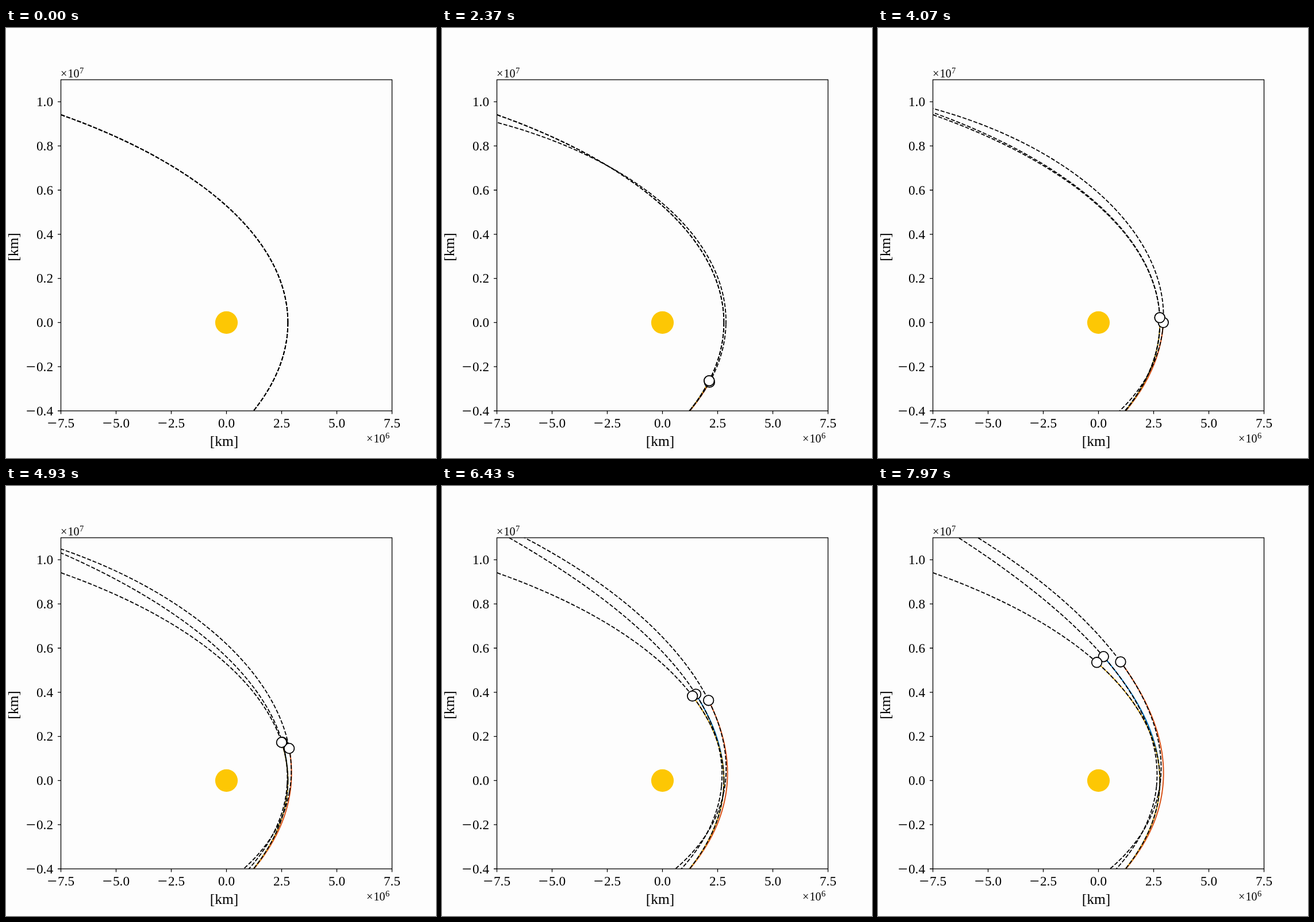
Animation of 748 by 748 pixels, one loop 8 s. Source, as an HTML page with a canvas:

```html
<!DOCTYPE html>
<html lang="en">
<head>
<meta charset="utf-8">
<title>Orbits around a star</title>
<style>
  html, body { margin: 0; width: 100%; height: 100%; overflow: hidden; background: #fdfdfd; }
  canvas { display: block; width: 748px; height: 748px; }
</style>
</head>
<body>
<canvas id="stage" width="748" height="748"></canvas>
<script>
const ctx = document.getElementById("stage").getContext("2d");
const PAPER = "#fdfdfd", INK = "#000";
const LOOP = 8000, FRAMES = 240, STEP = LOOP / FRAMES;
const BOX = { x: 95.5, y: 90, size: 576 };
const SUN = { x: 383.5, y: 512.4, r: 19.6 };
const UNIT = 38.4;                 // pixels per million km
const P = 203, ECC = 0.9;          // starting orbit, in pixels
const SPIN = 7.41;                 // angular momentum, px² per ms
const START = -Math.PI / 2;

// Each craft feels an outward push (a fraction of gravity) once past the angle `on`.
const crafts = [
  { color: "#0072bd", push: 0.1, on: 0 },
  { color: "#d95319", push: 0.1, on: START },
  { color: "#edb120", push: 0, on: 0 },
];

// Eccentricity vector of the momentary orbit.
function eccentricity(craft, a) {
  if (a <= craft.on) return [ECC, 0];
  return [
    ECC + craft.push * (Math.cos(craft.on) - Math.cos(a)),
    craft.push * (Math.sin(craft.on) - Math.sin(a)),
  ];
}

const conic = ([ex, ey], a) => P / (1 + ex * Math.cos(a) + ey * Math.sin(a));
const pathRadius = (craft, a) => conic(eccentricity(craft, a), a);
const place = (r, a) => [SUN.x + r * Math.cos(a), SUN.y - r * Math.sin(a)];

for (const craft of crafts) {
  const sub = 10, dt = STEP / sub;
  const rate = a => SPIN / pathRadius(craft, a) ** 2;
  let a = START;
  craft.angles = [];
  for (let i = 0; i < FRAMES; i++) {
    craft.angles.push(a);
    for (let k = 0; k < sub; k++) a += dt * rate(a + rate(a) * dt / 2);
  }
}

function strokeArc(from, to, radius) {
  const n = Math.max(1, Math.ceil(Math.abs(to - from) / 0.02));
  ctx.beginPath();
  for (let i = 0; i <= n; i++) {
    const a = from + (to - from) * i / n;
    ctx.lineTo(...place(radius(a), a));
  }
  ctx.stroke();
}

function drawOrbit(craft, a) {
  const e = eccentricity(craft, a);
  const periapsis = Math.atan2(e[1], e[0]);
  for (const side of [1, -1]) strokeArc(periapsis, periapsis + side * 2.6, b => conic(e, b));
}

function disc(x, y, r, fill) {
  ctx.beginPath();
  ctx.arc(x, y, r, 0, 2 * Math.PI);
  ctx.fillStyle = fill;
  ctx.fill();
}

function write(text, x, y, size, align = "left") {
  ctx.font = `${size}px "Liberation Serif", serif`;
  ctx.textAlign = align;
  ctx.fillText(text, x, y);
}

// Number whose right end is at x, with a wide minus sign.
function writeNumber(value, x, y) {
  write(Math.abs(value).toFixed(1), x, y, 23.2, "right");
  if (value < 0) write("−", x - 30, y + 2, 30, "right");
}

function writePower(exponent, x, y) {
  write("×", x + 1, y, 20);
  write("10", x + 13.5, y, 20);
  write(exponent, x + 34, y - 7, 14.5);
}

function drawAxes() {
  const { x, y, size } = BOX, bottom = y + size;
  ctx.strokeStyle = ctx.fillStyle = INK;
  ctx.lineWidth = 1.3;
  ctx.strokeRect(x, y, size, size);
  ctx.beginPath();
  for (let i = -3; i <= 3; i++) {
    const value = i * 2.5, tx = SUN.x + value * UNIT;
    ctx.moveTo(tx, bottom);
    ctx.lineTo(tx, bottom + 5.5);
    writeNumber(value, tx + (value < 0 ? 23.5 : 14.5), 694.5);
  }
  for (let i = -2; i <= 5; i++) {
    const ty = 512.4 - i * 2 * UNIT;
    ctx.moveTo(x, ty);
    ctx.lineTo(x - 5.5, ty);
    writeNumber(i / 5, 82, ty + 7.8);
  }
  ctx.stroke();
  writePower("7", 94, 86);
  writePower("6", 626, 721);
  write("[km]", 379.5, 727, 25.5, "center");
  ctx.save();
  ctx.translate(20.5, 381);
  ctx.rotate(-Math.PI / 2);
  write("[km]", 0, 0, 25.5, "center");
  ctx.restore();
}

function draw(frame) {
  ctx.fillStyle = PAPER;
  ctx.fillRect(0, 0, 748, 748);
  ctx.save();
  ctx.beginPath();
  ctx.rect(BOX.x, BOX.y, BOX.size, BOX.size);
  ctx.clip();
  disc(SUN.x, SUN.y, SUN.r, "#fdc704");

  ctx.lineWidth = 2;
  for (const craft of crafts) {
    ctx.strokeStyle = craft.color;
    strokeArc(START, craft.angles[frame], a => pathRadius(craft, a));
  }
  ctx.strokeStyle = INK;
  ctx.lineWidth = 1.8;
  ctx.setLineDash([7, 3]);
  for (const craft of crafts) drawOrbit(craft, craft.angles[frame]);
  ctx.setLineDash([]);
  for (const craft of crafts) {
    const a = craft.angles[frame];
    disc(...place(pathRadius(craft, a), a), 8.8, "#fff");
    ctx.stroke();
  }
  ctx.restore();
  drawAxes();
}

function tick() {
  const t = performance.now() % LOOP;
  draw(Math.floor(t / STEP + 0.15) % FRAMES);
  requestAnimationFrame(tick);
}
tick();
</script>
</body>
</html>
```
